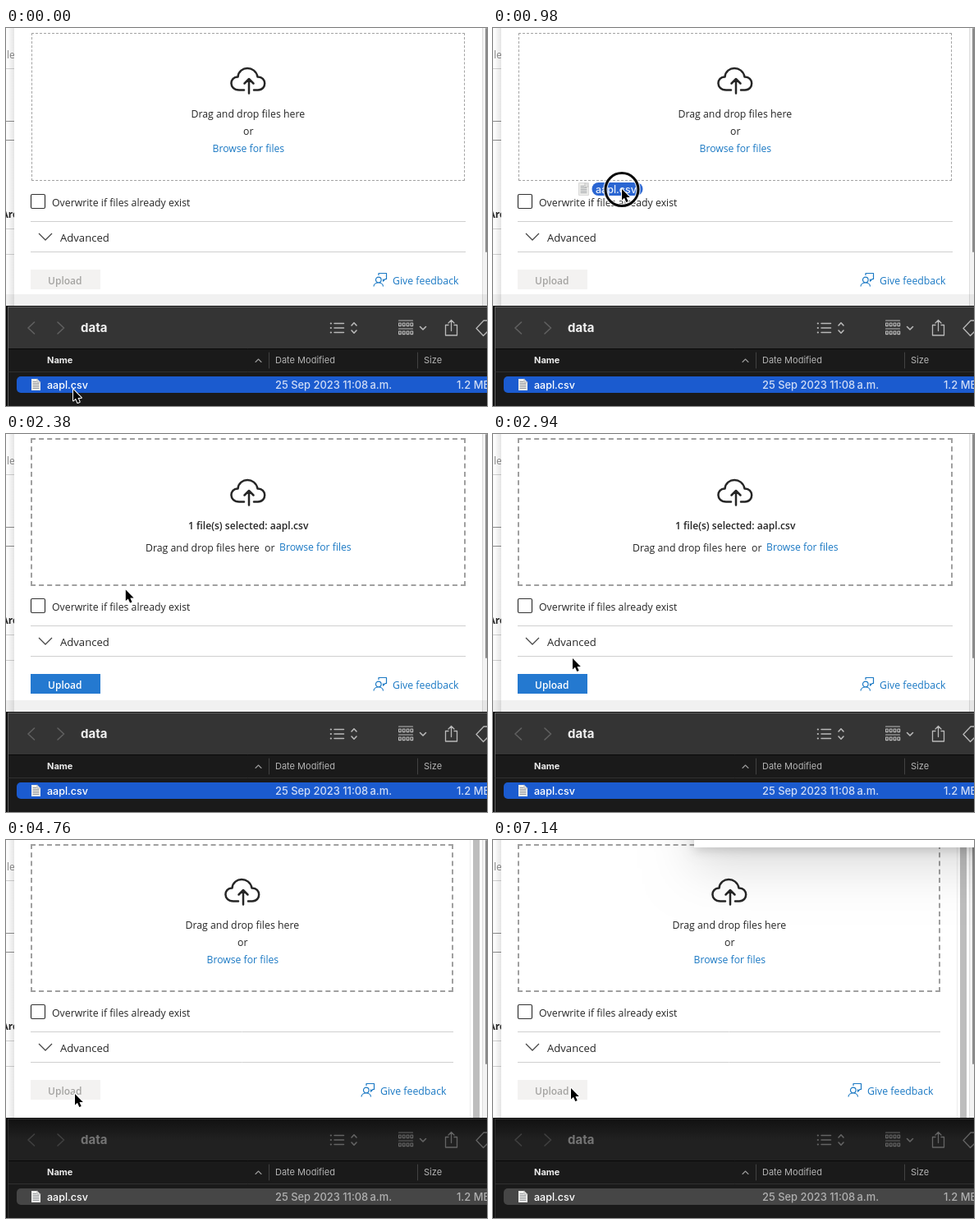
An HTML page with a canvas for the animation above (7.21 s loop, 586x460 px).

```html
<!DOCTYPE html>
<html lang="en">
<head>
<meta charset="utf-8">
<title>Drag a file to upload</title>
<style>
  html, body { margin: 0; width: 100%; height: 100%; overflow: hidden; background: #fff; }
  canvas { display: block; }
</style>
</head>
<body>
<canvas id="stage" width="586" height="460"></canvas>
<script>
const ctx = document.getElementById('stage').getContext('2d');
const LOOP = 7210, STEP = 70;
const WEB = '"Open Sans", "Noto Sans", sans-serif';
const MAC = 'Inter, Roboto, sans-serif';
const INK = '#262626', LINK = '#1b79c4', BLUE = '#1b5bcf';

// time, x, y of the pointer tip
const PATH = [
  [0, 82, 440], [70, 82, 440], [770, 137, 265], [980, 157, 196],
  [1330, 162, 163], [2100, 162, 163], [2870, 99, 269], [2940, 97, 273],
  [3640, 84, 309], [7139, 84, 309]
];

// Monotone cubic through the path points
function along(t, axis) {
  const slope = i => i < 0 || i > PATH.length - 2 ? 0
    : (PATH[i + 1][axis] - PATH[i][axis]) / (PATH[i + 1][0] - PATH[i][0]);
  const tangent = i => {
    const a = slope(i - 1), b = slope(i);
    return a * b > 0 ? 2 * a * b / (a + b) : 0;
  };
  let i = 0;
  while (i < PATH.length - 2 && t >= PATH[i + 1][0]) i++;
  const [p, q] = [PATH[i], PATH[i + 1]];
  const d = q[0] - p[0], u = (t - p[0]) / d, v = 1 - u;
  return p[axis] * v * v * (1 + 2 * u) + q[axis] * u * u * (3 - 2 * u)
    + d * u * v * (v * tangent(i) - u * tangent(i + 1));
}

function rect(x, y, w, h, color, radius = 0) {
  ctx.fillStyle = color;
  ctx.beginPath();
  ctx.roundRect(x, y, w, h, radius);
  ctx.fill();
}

function stroke(d, color, width = 1) {
  ctx.strokeStyle = color;
  ctx.lineWidth = width;
  ctx.stroke(new Path2D(d));
}

function text(str, x, y, size, color, weight = 400, family = WEB) {
  ctx.font = `${weight} ${size}px ${family}`;
  ctx.fillStyle = color;
  ctx.fillText(str, x, y);
}

function fade(x0, y0, x1, y1, from, to) {
  const g = ctx.createLinearGradient(x0, y0, x1, y1);
  g.addColorStop(0, from);
  g.addColorStop(1, to);
  return g;
}

function at(x, y, draw) {
  ctx.save();
  ctx.translate(x, y);
  draw();
  ctx.restore();
}

function backdrop() {
  rect(0, 0, 586, 338, '#fff');
  text('le', 1, 37, 12, '#8a8a8a');
  text('Arc', -5.5, 231, 12, INK, 700);
  stroke('M0 113.5H10M0 136.5H10', '#8d8d8d');
  stroke('M0 49.5H10M0 244.5H10M0 275.5H10', '#d2d2d2');
  rect(0, 0, 10, 338, fade(2, 0, 10, 0, 'rgba(0,0,0,.01)', 'rgba(0,0,0,.1)'));
  rect(580, 0, 6, 338, '#f3f3f3');
  stroke('M580.5 0V338', '#dedede');
  rect(584, 0, 2, 273, '#8c8c8c', 1);
  rect(10, 0, 570, 338, '#fff');
}

function cloud(dx, dy) {
  at(dx, dy, () => {
    ctx.lineCap = ctx.lineJoin = 'round';
    stroke('M290 75.5H284C271 75.5 272 59 282.5 59.5C284 45.5 304 45.5 306.5 59.5'
      + 'C318 59 318 75.5 307 75.5H302M296 79.5V62M290.5 67.5L296 62L301.5 67.5', INK, 2.5);
  });
}

// Dashes of three line widths, with gaps evened out so every side ends on a dash
function dashedBox(left, top, right, bottom, width, color) {
  const dash = 3 * width, h = width / 2;
  const side = (length, d) => {
    const count = Math.round((length + 2 * width) / (5 * width));
    ctx.setLineDash([dash, (length - count * dash) / (count - 1)]);
    stroke(d, color, width);
  };
  ctx.save();
  for (const y of [top + h, bottom - h]) side(right - left, `M${left} ${y}H${right}`);
  for (const x of [left + h, right - h]) side(bottom - top, `M${x} ${top}V${bottom}`);
  ctx.restore();
}

function dropZone(s) {
  if (s.hot) dashedBox(30, 5, s.reset ? 545 : 560, 185, 2, '#a0a0a0');
  else dashedBox(31, 6, 559, 186, 1, '#a3a3a3');

  if (s.chosen) {
    cloud(0, 7);
    text('1 file(s) selected: aapl.csv', 222, 116, 12.1, INK, 600);
    text('Drag and drop files here', 170, 143, 12.3, INK);
    text('or', 315, 143, 12.3, INK);
    text('Browse for files', 333, 142, 12.2, LINK);
    return;
  }
  const dx = s.reset ? -7 : 0, dy = s.hot ? -1 : 0;
  cloud(dx, dy);
  at(dx, dy, () => {
    text('Drag and drop files here', 225.5, 109, 12.3, INK);
    text('or', 289, 130, 12.3, INK);
    text('Browse for files', 251.5, 151, 12.2, LINK);
  });
}

function formRows(s) {
  const right = s.reset ? 545 : 560;
  at(0, s.hot ? -2 : 0, () => {
    ctx.strokeStyle = '#333';
    ctx.lineWidth = 1.2;
    ctx.beginPath();
    ctx.roundRect(30.5, 202.5, 17, 17, 1.5);
    ctx.stroke();
    text('Overwrite if files already exist', 56, 217, 12.3, INK);
    stroke(`M30 235.5H${right}M30 272.5H${right}`, '#cfcfcf');
    stroke('M40 250L48 258L56 250', '#444', 1.2);
    text('Advanced', 66, 260, 13.1, INK);
    rect(30, 294, 85, 24, s.ready ? '#2479d0' : '#f3f2f1');
    text('Upload', 51, 312, 12, s.ready ? '#fff' : '#a5a4a2', 600);

    at(s.reset ? -15 : 0, 0, () => {
      ctx.lineJoin = 'round';
      stroke('M448 314.5C448 308.5 459.5 308.5 459.5 314.5M450.5 306.5'
        + 'a3.3 3.3 0 1 0 6.6 0a3.3 3.3 0 1 0-6.6 0M454 301V298.5H463.5V305.5H462L459.5 308V305.5', LINK, 1.2);
      text('Give feedback', 471, 312, 12.3, LINK);
    });
  });
}

function toast(k) {
  const x = 586 - 341 * k;
  ctx.save();
  ctx.beginPath();
  ctx.rect(0, 0, 586, 338);
  ctx.clip();
  for (const [drop, blur, alpha] of [[25.6, 57.6, .13], [4, 12, .16]]) {
    ctx.shadowColor = `rgba(0,0,0,${alpha * k})`;
    ctx.shadowOffsetY = drop;
    ctx.shadowBlur = blur;
    rect(x, -90, 400, 99, '#fff');
  }
  ctx.restore();
}

function page(s) {
  backdrop();
  dropZone(s);
  formRows(s);
  if (s.reset) {
    stroke('M565.5 0V338', '#ececec');
    rect(569, 0, 8, 338, '#bdbdbd');
    if (s.toast > 0) toast(s.toast);
  }
  if (s.active) rect(0, 324, 586, 14, 'rgba(0,0,0,.055)');
}

function fileIcon(x, y) {
  at(x, y, () => {
    ctx.fillStyle = '#eeeeec';
    ctx.fill(new Path2D('M0 0H7L11 4V14H0Z'));
    stroke('M2 3.5H6M2 5.5H9M2 7.5H9M2 9.5H9M2 11.5H9', '#8f9296', .9);
    stroke('M7 0V4H11', '#a9a9a9', .8);
  });
}

function toolbar(on) {
  const tone = on ? '#b9b9b9' : '#646464';
  const nav = on ? '#606060' : '#404040';
  ctx.lineCap = ctx.lineJoin = 'round';
  stroke('M34.5 358L27 365L34.5 372M63 358L70.5 365L63 372', nav, 1.6);
  text('data', 91, 370, 15, on ? '#f0f0f0' : '#747474', 700, MAC);
  stroke('M400 359.5H411.5M400 365H411.5M400 370.5H411.5', tone, 1.5);
  stroke('M395.8 359.5h.1M395.8 365h.1M395.8 370.5h.1', tone, 2.2);
  stroke('M421 362L424 358.8L427 362M421 368L424 371.2L427 368', tone, 1.6);
  for (const y of [356, 366]) {
    stroke(`M478.5 ${y}H495.5`, tone, 1.2);
    for (let i = 0; i < 4; i++) {
      ctx.strokeStyle = tone;
      ctx.strokeRect(478.6 + i * 4.8, y + 3, 2.6, 3.6);
    }
  }
  stroke('M504.5 363.5L508 367L511.5 363.5', tone, 1.6);
  stroke('M539 361.5H535.5V374H549.5V361.5H546M542.5 368.5V355.5M539 359L542.5 355.5L546 359', tone, 1.3);
  stroke('M590 356H582L573 365.5L581.5 374.5L592 364', tone, 1.3);
}

function fileWindow(on) {
  rect(0, 338, 586, 122, '#0c0c0c');
  rect(2, 339, 590, 130, on ? '#626262' : '#303030');
  rect(3, 340, 590, 130, '#1a1a1a');
  rect(3, 340, 590, 50, on ? '#343434' : fade(0, 340, 0, 365, '#121212', '#212121'));
  stroke('M3 390.5H586', '#080808');
  toolbar(on);

  text('Name', 50, 408, 11, '#ececec', 700, MAC);
  text('Date Modified', 328, 408, 11, '#b4b4b4', 400, MAC);
  text('Size', 509, 408, 11, '#b4b4b4', 400, MAC);
  stroke('M304 406.5L307.5 403L311 406.5', '#9a9a9a', 1.1);
  stroke('M320.5 395V414M501.5 395V414', '#424242');
  stroke('M3 418.5H586', '#303030');

  rect(13, 424, 600, 20, on ? BLUE : '#464646', 5);
  fileIcon(31, 427);
  const soft = on ? '#d0ddf6' : '#b0b0b0';
  text('aapl.csv', 50, 438.5, 12.5, '#fff', 500, MAC);
  text('25 Sep 2023 11:08\u2009a.m.', 328, 438.5, 12.9, soft, 500, MAC);
  text('1.2 MB', 549, 438.5, 12.9, soft, 500, MAC);
}

function draggedFile() {
  ctx.globalAlpha = .85;
  rect(-53, -8, 13, 16, '#d2d2d2', 1);
  fileIcon(-52, -7);
  ctx.globalAlpha = .93;
  rect(-36.5, -8, 62, 16, BLUE, 8);
  ctx.globalAlpha = .9;
  text('aapl.csv', -32, 4.5, 12.5, '#fff', 500, MAC);
  ctx.globalAlpha = 1;
}

function ring() {
  for (const [color, width] of [['rgba(255,255,255,.75)', 5.5], ['#0a0a0a', 3]]) {
    ctx.strokeStyle = color;
    ctx.lineWidth = width;
    ctx.beginPath();
    ctx.arc(0, .5, 20, 0, 7);
    ctx.stroke();
  }
}

function arrow() {
  const shape = 'M0 0V13.5L3 10.8L5.3 16L7.7 15L5.5 10H9.8Z';
  ctx.lineJoin = 'round';
  stroke(shape, '#fff', 2);
  ctx.fillStyle = '#000';
  ctx.fill(new Path2D(shape));
}

function draw(t) {
  const between = (a, b) => t >= a && t < b;
  const slide = Math.min(1, Math.max(0, (t - 4760) / 280));
  const s = {
    hot: t >= 1050,
    chosen: between(1890, 4760),
    ready: between(2170, 4760),
    active: t < 3990,
    reset: t >= 4760,
    toast: 1 - (1 - slide) ** 2
  };
  const [x, y] = t >= 7140 ? [95, 302] : [along(t, 1), along(t, 2)];

  ctx.clearRect(0, 0, 586, 460);
  ctx.lineCap = 'butt';
  page(s);
  fileWindow(s.active);
  at(x, y, () => {
    if (between(210, 1820)) draggedFile();
    if (between(70, 1820) || between(3850, 4060)) ring();
    arrow();
  });
}

const start = performance.now();
function tick() {
  const t = (performance.now() - start) % LOOP;
  draw(Math.floor(t / STEP) * STEP);
  requestAnimationFrame(tick);
}
tick();
</script>
</body>
</html>
```
